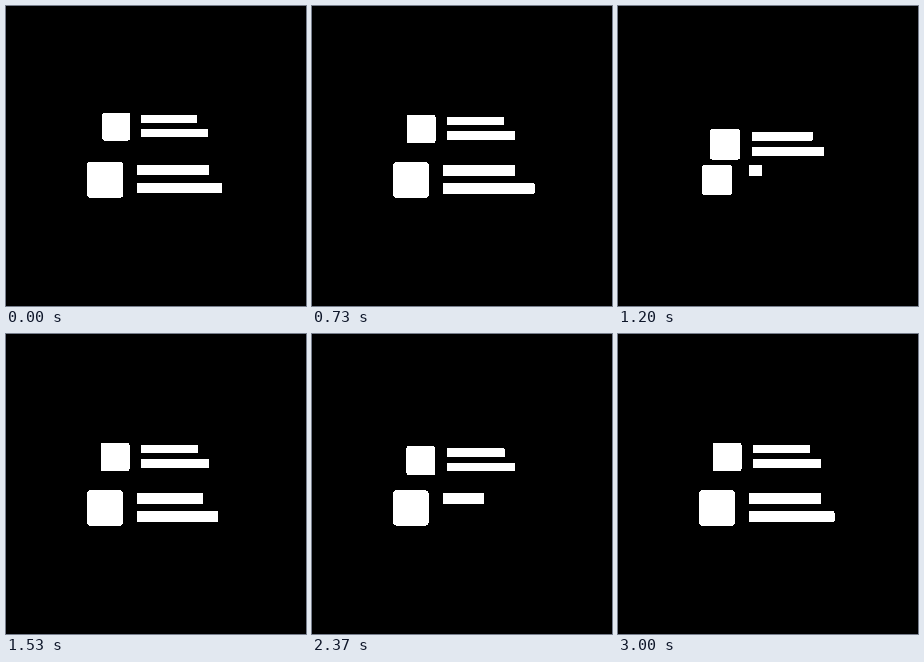
An HTML page without scripts that plays this animation: 300 px wide and 300 px high, repeating every 3030 ms.

```html
<!DOCTYPE html>
<html lang="en">
<head>
<meta charset="utf-8">
<title>List loader</title>
<style>
  @property --p { syntax: "<number>"; inherits: true; initial-value: 0; }

  html, body { margin: 0; width: 100%; height: 100%; overflow: hidden; background: #000; }

  /* --p counts ticks of 1/30 s: rounds of 31.5, the third one cut short */
  svg {
    display: block; width: 100vw; height: 100vh;
    fill: #fff; shape-rendering: crispEdges;
    animation: ticks 3030ms linear infinite;
  }
  @keyframes ticks {
    0%, 34.654%, 69.307% { --p: 0; }
    34.653%, 69.306% { --p: 31.5; }
    100% { --p: 27.9; }
  }

  /* --u runs from 1 to 0 over --span ticks after --from */
  .part {
    --u: clamp(0, 1 - (var(--p) - var(--from)) / var(--span), 1);
    --u2: calc(var(--u) * var(--u));
    --u3: calc(var(--u2) * var(--u));
    --cubic: calc(1 - var(--u3));
    --quart: calc(1 - var(--u2) * var(--u2));
    --back: calc(1 - 2.7 * var(--u3) + 1.7 * var(--u2));
  }
  .leave {
    --from: .6; --span: 1.4;
    translate: 150px calc(110.6px + 10px * var(--u));
    scale: calc(.73 + .05 * var(--u));
    opacity: var(--u);
  }
  .rise {
    --from: 0; --span: 13.8;
    translate: 150px calc(174px - 51px * var(--cubic));
    scale: calc(1 - .2 * var(--quart));
  }
  .thumb {
    --from: 0; --span: 12.5;
    transform-origin: -51px 0;
    scale: var(--quart);
  }
  .line1 { --from: 3.2; --span: 20; width: calc(72px * var(--cubic)); }
  .line2 { --from: 8.2; --span: 19; width: calc(85.5px * var(--back)); }
</style>
</head>
<body>
<svg viewBox="0 0 300 300">
  <defs>
    <g id="item">
      <rect x="-69" y="-18" width="36" height="36" rx="3"/>
      <rect x="-19" y="-15" width="72" height="10.4" rx=".8"/>
      <rect x="-19" y="3" width="85.4" height="10.4" rx=".8"/>
    </g>
  </defs>
  <use class="part leave" href="#item"/>
  <use class="part rise" href="#item"/>
  <g transform="translate(150 174)">
    <rect class="part thumb" x="-69" y="-18" width="36" height="36" rx="4"/>
    <rect class="part line1" x="-19" y="-15" height="11" rx="1.5"/>
    <rect class="part line2" x="-19" y="3" height="11" rx="1.5"/>
  </g>
</svg>
</body>
</html>
```
